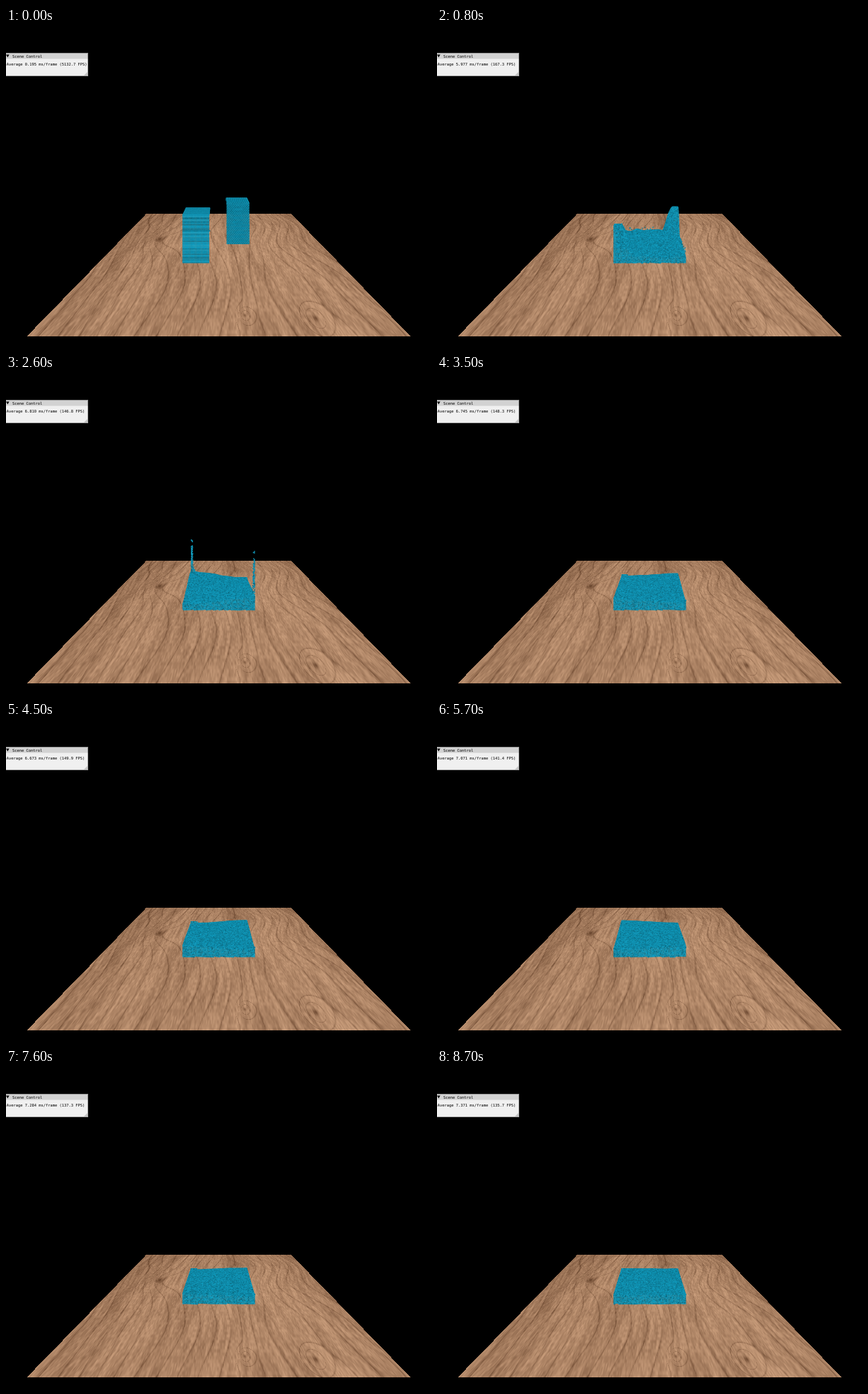
These frames come from a looping animation (600 px wide and 450 px high, 8.8 s). An HTML page with a canvas:

```html
<!DOCTYPE html>
<html lang="en">
<head>
<meta charset="utf-8">
<title>Fluid scene</title>
<style>
  html, body { margin: 0; width: 100%; height: 100%; overflow: hidden; background: #000; }
  canvas { display: block; }
</style>
</head>
<body>
<canvas id="stage" width="600" height="450"></canvas>
<script>
const ctx = document.getElementById('stage').getContext('2d');
const LOOP = 8800, STEP = 100;
const CX = 300.3, HORIZON = 157, FOCAL = 278;
const TABLE = { top: 262, bottom: 435, width: 542 };
const TANK = { half: 0.29, near: 1.6, far: 2.06, depth: 0.078 };

const clamp = x => Math.max(0, Math.min(1, x));
const mix = (a, b, k) => a + (b - a) * k;
const smooth = (a, b, x) => { const k = clamp((x - a) / (b - a)); return k * k * (3 - 2 * k); };
const bell = x => Math.exp(-x * x);

function hash(x, y = 0, z = 0) {
  let n = Math.imul(x, 374761393) ^ Math.imul(y, 668265263) ^ Math.imul(z, 1274126177);
  n = Math.imul(n ^ (n >>> 13), 1103515245);
  n = Math.imul(n ^ (n >>> 15), 2246822519);
  return ((n ^ (n >>> 16)) >>> 0) / 4294967296;
}

function noise(x, y, seed = 0) {
  const i = Math.floor(x), j = Math.floor(y);
  const a = smooth(0, 1, x - i), b = smooth(0, 1, y - j);
  return mix(mix(hash(i, j, seed), hash(i + 1, j, seed), a),
             mix(hash(i, j + 1, seed), hash(i + 1, j + 1, seed), a), b);
}

// ---- wooden table: u across, q away from the viewer ----
const KNOTS = [
  { u: -0.303, q: 1.97, size: 0.055 },
  { u: 0.076, q: 1.12, size: 0.013 },
  { u: 0.278, q: 1.103, size: 0.022 }
];

function grain(u, q) {
  let rings = 0, core = 0;
  for (const k of KNOTS) {
    const d = Math.hypot((u - k.u) / k.size, (q - k.q) / (k.size * 2.6));
    rings += 2.6 * bell(d / 1.6);
    core += bell(d * 3);
  }
  const bend = u + (noise(u * 4 + 9, q * 2.2, 1) - 0.5) * 0.1;
  const contour = bend * 16 + noise(bend * 6, q * 1.5, 2) * 2.4 + rings;
  const line = Math.pow(1 - Math.abs(Math.sin(contour * Math.PI)), 8);
  const broad = noise(bend * 9 + 3, q * 0.9, 3) - 0.5;
  const fibre = noise(bend * 110, q * 6, 4) - 0.5;
  const pore = noise(u * 300, q * 45, 5) - 0.5;
  const centre = bell((u - 0.03) / 0.2);
  const shade = smooth(1.7, 2.65, q) * (0.06 + 0.14 * bell((u - 0.1) / 0.12));
  return 0.55 + broad * 0.12 + fibre * 0.22 + pore * 0.2 + centre * 0.09
       - line * 0.24 - shade - core * 0.35 - 0.06 * smooth(0.3, 0.5, Math.abs(u));
}

function makeTable() {
  const layer = document.createElement('canvas');
  const rows = TABLE.bottom - TABLE.top;
  layer.width = 600; layer.height = rows;
  const g = layer.getContext('2d');
  const img = g.createImageData(600, rows);
  for (let r = 0; r < rows; r++) {
    const s = r + TABLE.top + 0.5 - HORIZON;
    for (let x = 0; x < 600; x++) {
      const u = (x + 0.5 - CX) * FOCAL / (TABLE.width * s);
      if (Math.abs(u) > 0.5) continue;
      const k = clamp(grain(u, FOCAL / s));
      img.data.set([mix(92, 236, k), mix(58, 189, k), mix(36, 151, k), 255], (r * 600 + x) * 4);
    }
  }
  g.putImageData(img, 0, 0);
  return layer;
}

// ---- fluid: u left to right, w front to back, both 0..1 ----
function project(u, w, h) {
  const s = FOCAL / mix(TANK.near, TANK.far, w);
  return [CX + (u * 2 - 1) * TANK.half * s, HORIZON + (1 - h) * s];
}

// One collapsing column and the sheet of water running out of it.
function column(u, w, t) {
  const k = smooth(0, 1.4, t);
  const edge = mix(0.365, 0.1, k), soft = mix(0.002, 0.2, k);
  const side = x => 1 - smooth(edge - soft, edge + soft, x);
  const tall = mix(0.39, 0.24, k) * (1 - smooth(1.3, 2.2, t));
  const reach = 1.8 * t * t;
  const wet = smooth(0, 0.2, reach - Math.max(u, w) + 0.365);
  return { pile: tall * side(u) * side(w), wet: wet * smooth(0, 0.5, t) };
}

// The pool rocks between the two pairs of opposite corners.
function pool(u, w, t) {
  const swing = Math.cos(Math.max(0, t - 0.5) / 3.6 * Math.PI * 2);
  const amp = 0.033 * Math.exp(-(t - 2.6) / 3.4) * smooth(0.6, 2, t);
  const chop = 0.004 + 0.03 * smooth(0.3, 1, t) * Math.exp(-Math.max(0, t - 1.2));
  return TANK.depth * mix(0.7, 1, smooth(1.2, 2.2, t))
       + amp * swing * Math.cos(Math.PI * u) * Math.cos(Math.PI * w)
       + chop * (noise(u * 8 + t, w * 6, 8) - 0.5);
}

function height(u, w, t) {
  const a = column(u, w, t), b = column(1 - u, 1 - w, t);
  return Math.max(a.pile, b.pile, pool(u, w, t) * Math.max(a.wet, b.wet));
}

function dot(x, y, r, size = 1.5) {
  const k = 0.62 + 0.48 * Math.sqrt(r);
  ctx.fillStyle = `rgb(${18 * k | 0},${147 * k | 0},${179 * k | 0})`;
  ctx.fillRect(x - size / 2, y, size, size);
}

function drawFluid(t, frame) {
  const nu = 90, nw = 64;
  const order = 0.8 * (1 - smooth(0, 0.4, t));
  let ahead = [];
  const field = Array.from({ length: nw }, (_, j) =>
    Array.from({ length: nu }, (_, i) => height(i / (nu - 1), j / (nw - 1), t)));
  for (let j = nw - 1; j >= 0; j--) {
    const w = j / (nw - 1);
    for (let i = 0; i < nu; i++) {
      const u = i / (nu - 1), h = field[j][i];
      if (h < 0.004) continue;
      const [x, y] = project(u, w, h);
      let end = project(u, w, 0)[1];
      if (j > 0) end = Math.min(end, project(u, (j - 1) / (nw - 1), field[j - 1][i])[1] + 1.5);
      let n = 0;
      do {
        const layer = u < 0.5 ? hash(n + j, 3) : ((n + i) % 3) * 0.35;
        dot(x, y + n * 1.2, mix(hash(i, j * 97 + n, frame), layer, order));
        n++;
      } while (y + n * 1.2 < end);
    }
  }
}

// Droplets thrown up the back-left and right walls.
function drawSpray(t, frame) {
  for (let i = 0; i < 240; i++) {
    const p = (t - 0.6 - hash(i, 1) * 0.7) / 1.1;
    if (p <= 0 || p >= 1) continue;
    const left = i % 2, r = hash(i, 2);
    const along = r * r * 0.65;
    const u = left ? along : 1 - hash(i, 3) * 0.04;
    const w = left ? 1 - hash(i, 3) * 0.04 : along;
    const top = 0.27 - along * 0.13;
    const [x, y] = project(u, w, top * mix(0.45, 1, hash(i, 4)) * 4 * p * (1 - p));
    dot(x, y, hash(i, 5, frame));
  }
}

function drawJet(t, frame, u, w, top, side) {
  const lift = Math.sin(clamp((t - 1.95) / 1.3) * Math.PI);
  if (lift <= 0) return;
  for (let i = 0; i < 170; i++) {
    const r = Math.pow(hash(i, 11, side + 2), 1.3);
    if (r > 0.84 && r < 0.95) continue;
    const [x, y] = project(u, w, mix(TANK.depth, top, r * lift));
    const spread = 2 + 7 * Math.pow(1 - r, 6);
    dot(x + side * (hash(i, 12, frame) * spread - 0.4), y, hash(i, 13, frame));
  }
}

// ---- control panel ----
const TIMINGS = [[0, 0.19483], [0.9, 6.7], [1.4, 6.744], [2.6, 6.81], [4.5, 6.673],
                 [5.7, 7.071], [6.6, 7.204], [8.7, 7.371]];

function frameTime(t) {
  const i = Math.max(1, TIMINGS.findIndex(([at]) => at >= t));
  const [a, from] = TIMINGS[i - 1], [b, to] = TIMINGS[i];
  return mix(from, to, clamp((t - a) / (b - a)));
}

function triangle(colour, ...p) {
  ctx.fillStyle = colour;
  ctx.beginPath();
  ctx.moveTo(p[0], p[1]);
  ctx.lineTo(p[2], p[3]);
  ctx.lineTo(p[4], p[5]);
  ctx.fill();
}

function drawPanel(t) {
  const ms = frameTime(t);
  ctx.fillStyle = '#f0f0f0';
  ctx.fillRect(0, 35, 116, 33);
  ctx.fillStyle = '#d2d2d2';
  ctx.fillRect(0, 35, 116, 8.5);
  ctx.strokeStyle = 'rgba(0,0,0,.3)';
  ctx.lineWidth = 1;
  ctx.strokeRect(-0.5, 35.5, 116, 32);
  triangle('#000', 0, 37.5, 4.6, 37.5, 2.3, 41.5);
  triangle('#c6c6c6', 115, 62, 115, 67, 110, 67);
  ctx.fillStyle = '#000';
  ctx.font = '5.4px "DejaVu Sans Mono", monospace';
  ctx.fillText('Scene Control', 9, 41.5);
  ctx.fillText(`Average ${ms.toFixed(3)} ms/frame (${(1000 / ms).toFixed(1)} FPS)`, 0.8, 52.6);
}

const table = makeTable();
let shown = -1;

function draw(now) {
  const frame = Math.floor((now % LOOP) / STEP);
  if (frame !== shown) {
    shown = frame;
    const t = frame * STEP / 1000;
    ctx.fillStyle = '#000';
    ctx.fillRect(0, 0, 600, 450);
    ctx.drawImage(table, 0, TABLE.top);
    drawFluid(t, frame);
    drawSpray(t, frame);
    drawJet(t, frame, 0.01, 1, 0.445, 1);
    drawJet(t, frame, 1, 0, 0.483, -1);
    drawPanel(t);
  }
  requestAnimationFrame(draw);
}
requestAnimationFrame(draw);
</script>
</body>
</html>
```
